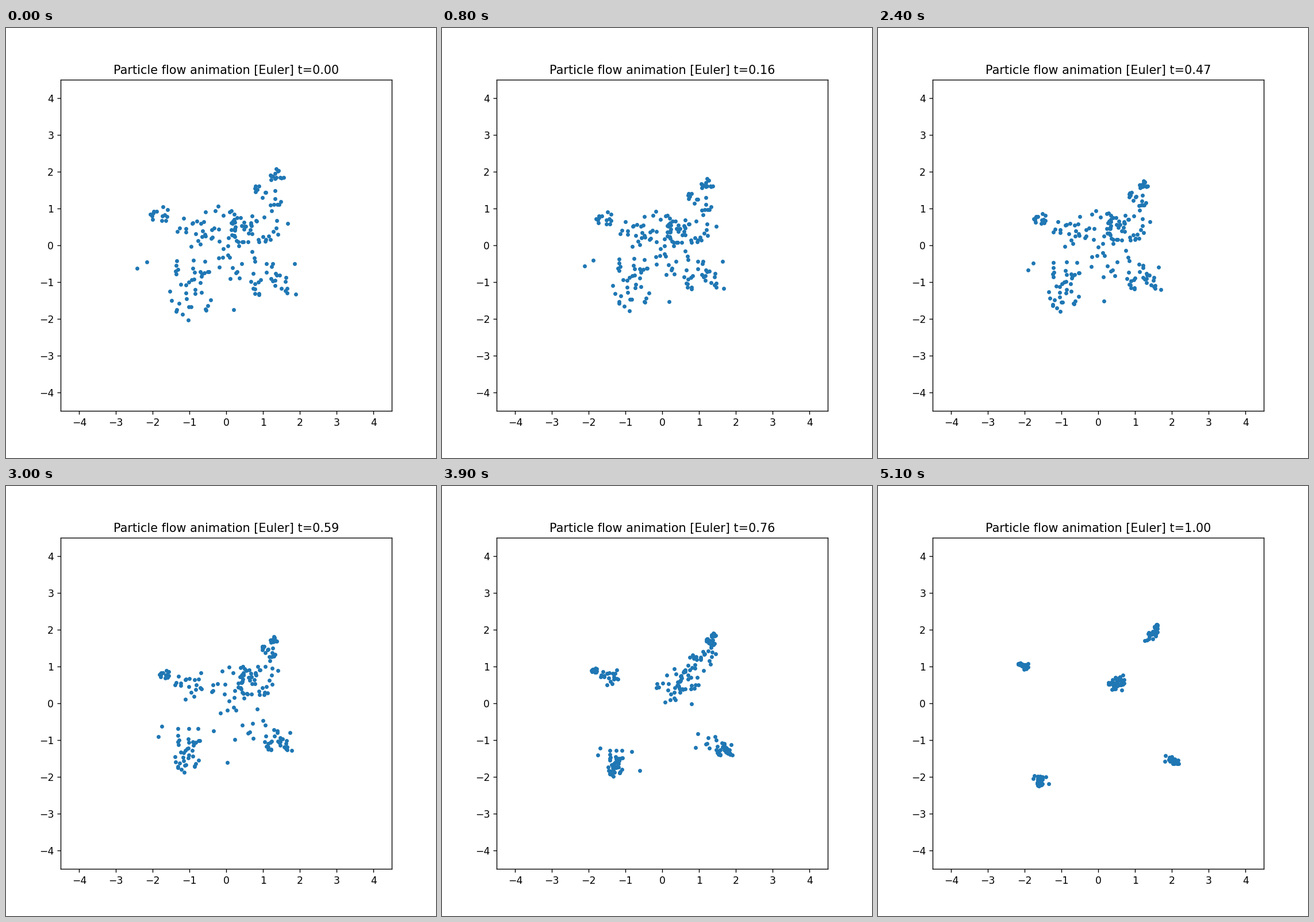
A matplotlib script for the animation above (5200 ms loop, 748 px wide and 748 px high).

```python
import matplotlib.pyplot as plt
import numpy as np
from matplotlib.animation import FuncAnimation

SIZE, INCHES = 748, 6
FRAMES, INTERVAL = 52, 100
STEP = 1 / (FRAMES - 1)

# Gaussian modes that the particles flow into
MODES = np.array([(-2.04, 1.03), (1.5, 2), (0.47, 0.5), (2.05, -1.57), (-1.56, -2.12)])
MODE_STD = 0.1
SOFTNESS = 0.07  # blurs the borders between modes

# Patches of particles at t = 0: centre x, y, radius, count
PATCHES = [
    (-1.82, 0.85, 0.25, 13), (1.38, 1.88, 0.2, 14), (1.1, 1.3, 0.48, 16),
    (0.45, 0.42, 0.37, 28), (1.0, 0.5, 0.45, 16), (-0.2, 0.6, 0.5, 20),
    (-0.85, 0.4, 0.5, 18), (0.3, -0.45, 0.55, 18), (-0.9, -0.6, 0.5, 17),
    (-1.0, -1.5, 0.6, 22), (1.2, -1.0, 0.55, 26),
]
# Outermost single particles
OUTER = [(-2.42, -0.63), (-2.16, -0.46), (1.89, -1.34), (1.85, -0.51),
         (1.66, 0.59), (0.19, -1.75)]


def start_points():
    rng = np.random.default_rng(4)
    parts = [np.array(OUTER)]
    for x, y, radius, n in PATCHES:
        angle = rng.uniform(0, 2 * np.pi, n)
        r = radius * np.sqrt(rng.uniform(0, 1, n))
        parts.append(np.column_stack((x + r * np.cos(angle), y + r * np.sin(angle))))
    return np.vstack(parts)


def velocity(p, t):
    """Marginal velocity of the straight path from noise to the mixture."""
    var = (1 - t) ** 2 + (t * MODE_STD) ** 2
    offset = p[:, None] - t * MODES
    log_w = -(offset ** 2).sum(2) / (2 * (var + SOFTNESS * t))
    w = np.exp(log_w - log_w.max(1, keepdims=True))
    w /= w.sum(1, keepdims=True)
    pull = MODES + (t * MODE_STD ** 2 - (1 - t)) / var * offset
    return (w[:, :, None] * pull).sum(1)


def euler_path():
    path = [start_points()]
    for i in range(FRAMES - 1):
        path.append(path[-1] + STEP * velocity(path[-1], i * STEP))
    return path


path = euler_path()

fig, ax = plt.subplots(figsize=(INCHES, INCHES), dpi=SIZE / INCHES)
ax.set_aspect("equal")
ax.set(xlim=(-4.5, 4.5), ylim=(-4.5, 4.5),
       xticks=range(-4, 5), yticks=range(-4, 5))
dots, = ax.plot([], [], ".", color="#1f77b4")
title = ax.set_title("", pad=5.6)


def draw(i):
    dots.set_data(path[i][:, 0], path[i][:, 1])
    title.set_text(f"Particle flow animation [Euler] t={i * STEP:.2f}")
    return dots, title


anim = FuncAnimation(fig, draw, frames=FRAMES, interval=INTERVAL,
                     repeat=True, repeat_delay=0)
plt.show()
```
